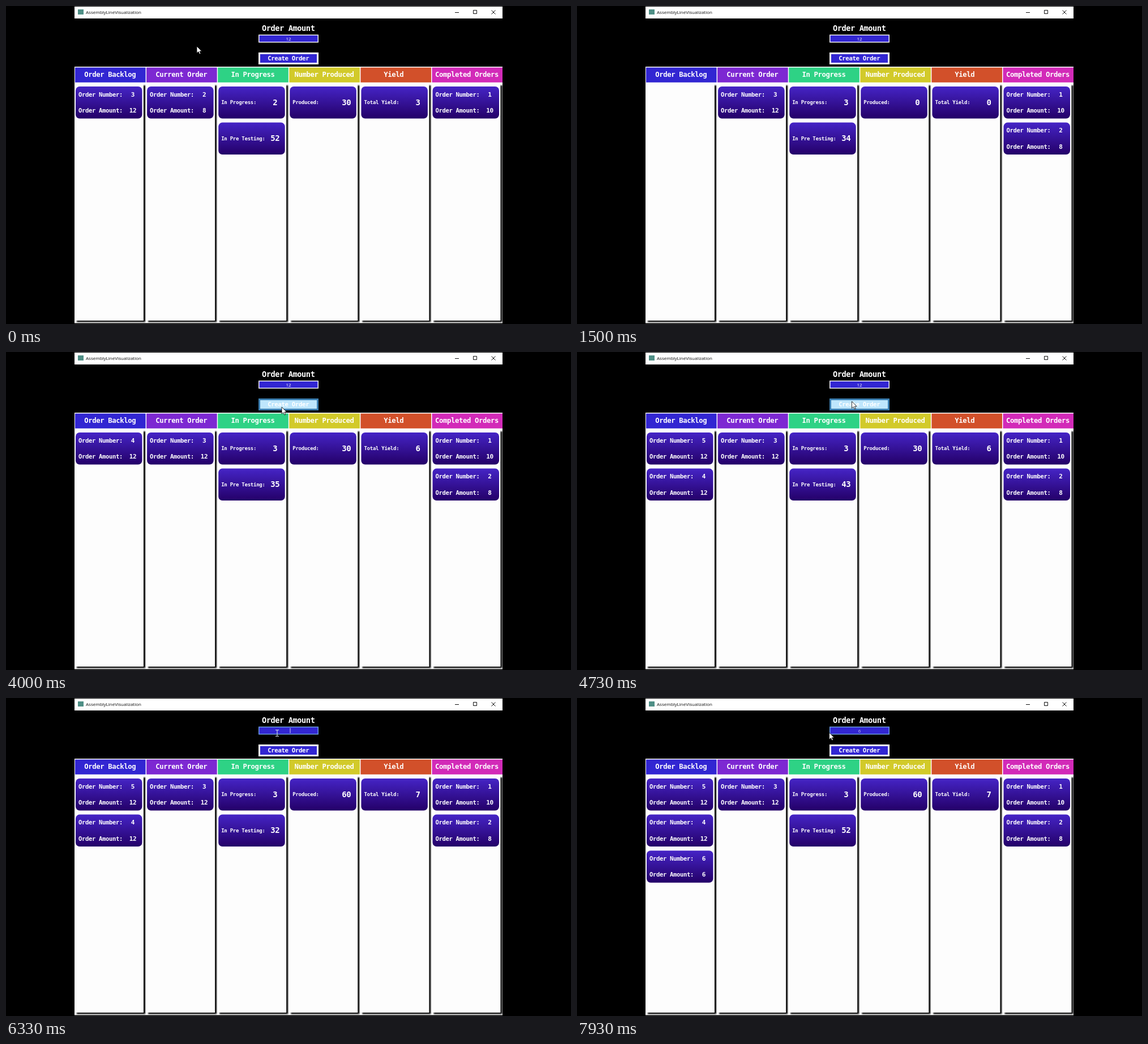
An HTML page that plays this animation: 998 px wide and 561 px high, repeating every 8000 ms.

```html
<!DOCTYPE html>
<html lang="en">
<head>
<meta charset="utf-8">
<title>Assembly line</title>
<style>
  html, body { margin: 0; width: 100%; height: 100%; overflow: hidden; background: #000; }
  svg { display: block; width: 100vw; height: 100vh; }
  text { white-space: pre; }
  .mono { font-family: "DejaVu Sans Mono", monospace; font-weight: 700; fill: #fff; }
  .ui { font-family: "Open Sans", "Noto Sans", sans-serif; font-size: 8px; }
  .mid { text-anchor: middle; }
</style>
</head>
<body>
<svg viewBox="0 0 998 561">
  <defs>
    <linearGradient id="cardFill" x1="0" y1="0" x2="0" y2="1">
      <stop offset="0" stop-color="#4524c6"/>
      <stop offset="1" stop-color="#240068"/>
    </linearGradient>
    <filter id="soft" x="-5%" y="-5%" width="110%" height="110%">
      <feGaussianBlur stdDeviation="0.9"/>
    </filter>
    <clipPath id="win"><rect x="121" y="1" width="756" height="558.5"/></clipPath>
  </defs>
  <rect width="998" height="561"/>
  <g clip-path="url(#win)">
    <rect x="121" y="1" width="756" height="559" fill="#fff"/>
    <rect x="121" y="22" width="756" height="85"/>
    <rect x="127" y="6" width="10" height="9" fill="#4f8f86"/>
    <text class="ui" x="141" y="14" fill="#111">AssemblyLineVisualization</text>
    <path d="M793 11.5h7M825.5 7.5h6v6h-6zM857.5 7.5l7 7M864.5 7.5l-7 7" fill="none" stroke="#111"/>
    <g id="board"></g>
    <g id="cards"></g>
    <rect id="field" x="446.75" y="51.25" width="104.5" height="12.5" fill="#3226d2" stroke-width="1.5"/>
    <text id="entry" class="ui mid" x="499" y="60.5"></text>
    <path id="caret" d="M502 53v9" stroke="#fff" stroke-width=".8"/>
    <rect id="button" x="447.5" y="83.5" width="103" height="18" stroke-width="3"/>
    <g id="labels"></g>
    <path id="arrow" d="M0 0V12.2L2.9 9.6 4.9 14 6.9 13.1 5 8.9H8.8Z" fill="#fff" stroke="#000" stroke-width=".8"/>
    <path id="beam" d="M-3 -5.5H-.8L0 -5 .8 -5.5H3M0 -5V5M-3 5.5H-.8L0 5 .8 5.5H3" fill="none" stroke="#d8e4e8" stroke-width="1.1"/>
  </g>
</svg>
<script>
const LOOP = 8000, COL = 126.1, ROW = 63.6;
const $ = id => document.getElementById(id);

// Unwrapped unit count: [ms, units]; every 30 units one batch leaves pre testing.
const units = [[0, 52.5], [1500, 64.5], [2830, 81.02], [3000, 82.02], [4000, 95.5], [5400, 111.4],
  [5530, 112.02], [5830, 117.02], [5970, 118.02], [7170, 132.4], [7930, 142.02], [8000, 142.6]];

// Pointer tip: [ms, x, y]
const path = [[0, 337, 71], [150, 337, 71], [500, 345, -25], [2300, 960, -25], [2330, 900, 190],
  [2600, 577, 108], [2760, 485, 98], [3900, 487, 97], [4650, 487, 97], [4950, 481, 60],
  [5300, 479, 62], [6750, 479, 62], [7000, 501, 90], [7640, 501, 90], [7760, 506, 46], [7920, 445.5, 61]];

// Order numbers with the time each joins the backlog
const created = { 4: 2700, 5: 4300, 6: 7400 };

function sample(keys, t) {
  const i = keys.findIndex(k => k[0] > t);
  if (i < 0) return keys[keys.length - 1].slice(1);
  const a = keys[i - 1], b = keys[i], p = (t - a[0]) / (b[0] - a[0]);
  return a.slice(1).map((v, j) => v + (b[j + 1] - v) * p);
}

// Monospaced text with a given advance per character
function mono(str, x, y, advance, cls = "") {
  const size = advance * 1.75, gap = advance - size * 0.602;
  return `<text class="mono ${cls}" x="${x}" y="${y}" font-size="${size}" letter-spacing="${gap}">${str}</text>`;
}

function card(col, row, body) {
  return `<g transform="translate(${123 + col * COL} ${142 + row * ROW})">
    <rect width="117.5" height="56.5" rx="7" fill="url(#cardFill)"/>${body}</g>`;
}

const order = (col, row, id, amount) => card(col, row,
  mono("Order Number:", 5, 17.8, 6) + mono(id, 101, 17.8, 6.3, "mid") +
  mono("Order Amount:", 5, 46, 6) + mono(amount, 101, 46, 6.3, "mid"));

const stat = (col, row, label, value) => card(col, row,
  mono(label, 5, 31, 5.17) + mono(value, 100, 32.5, 8, "mid"));

function drawBoard() {
  const heads = [["Order Backlog", "#3226d2", 183.7], ["Current Order", "#7d28d2", 309.7],
    ["In Progress", "#2ed285", 436], ["Number Produced", "#d2ca2a", 562],
    ["Yield", "#d2502a", 684.7], ["Completed Orders", "#d22ab8", 814]];
  $("board").innerHTML = heads.map(([name, fill, x], i) => {
    const left = 121 + i * COL;
    return `<rect x="${left + 1}" y="108.5" width="124.6" height="26.3" fill="${fill}"/>
      ${mono(name, x, 125, 7, "mid")}
      <rect x="${left + 4}" y="140" width="121" height="417.5" fill="#000" filter="url(#soft)"/>
      <rect x="${left}" y="136" width="122" height="419" fill="#fdfdfd"/>`;
  }).join("");
  $("labels").innerHTML = mono("Order Amount", 498.7, 44.2, 7.8, "mid") +
    mono("Create Order", 498.7, 96, 6.1, "mid");
}

let shown = "";
function drawCards(t) {
  const n = Math.floor(sample(units, t)[0]);
  const batch = Math.floor(n / 30);
  const [produced, total] = { 1: [30, 3], 2: [0, 0], 3: [30, 6], 4: [60, 7] }[batch];
  const first = batch < 2;
  const backlog = first ? [3] : [5, 4, 6].filter(id => t >= created[id]);
  const key = [n, backlog].join();
  if (key === shown) return;
  shown = key;
  $("cards").innerHTML =
    backlog.map((id, row) => order(0, row, id, id === 6 ? 6 : 12)).join("") +
    (first ? order(1, 0, 2, 8) : order(1, 0, 3, 12) + order(5, 1, 2, 8)) +
    stat(2, 0, "In Progress:", first ? 2 : 3) +
    stat(2, 1, "In Pre Testing:", 30 + n % 30) +
    stat(3, 0, "Produced:", produced) +
    stat(4, 0, "Total Yield:", total) +
    order(5, 0, 1, 10);
}

function set(id, attrs) {
  for (const name in attrs) $(id).setAttribute(name, attrs[name]);
}

function drawInput(t) {
  const [x, y] = sample(path, t);
  const inside = (top, bottom) => x >= 446 && x <= 552 && y >= top && y <= bottom;
  const onField = inside(50, 65), onButton = inside(82, 103);
  const focused = t >= 6000;
  const caretOn = focused && t < 7640 && (t - 6000) % 1060 < 530;
  const place = `translate(${x} ${y})`;

  set("field", { stroke: onField || focused ? "#6c9be6" : "#f4f4ff" });
  $("entry").textContent = t < 6300 ? "12" : t < 6450 ? "" : "6";
  set("entry", { fill: onField && !focused ? "#7fd0f0" : t >= 7640 ? "#c4c8ee" : "#fff" });
  set("caret", { visibility: caretOn ? "visible" : "hidden" });
  set("button", { fill: onButton ? "#bee6fd" : "#3226d2", stroke: onButton ? "#3c7fb1" : "#fff" });
  set("arrow", { transform: place, visibility: onField ? "hidden" : "visible" });
  set("beam", { transform: place, visibility: onField ? "visible" : "hidden" });
}

function frame() {
  const t = performance.now() % LOOP;
  drawCards(t);
  drawInput(t);
  requestAnimationFrame(frame);
}

drawBoard();
frame();
</script>
</body>
</html>
```
